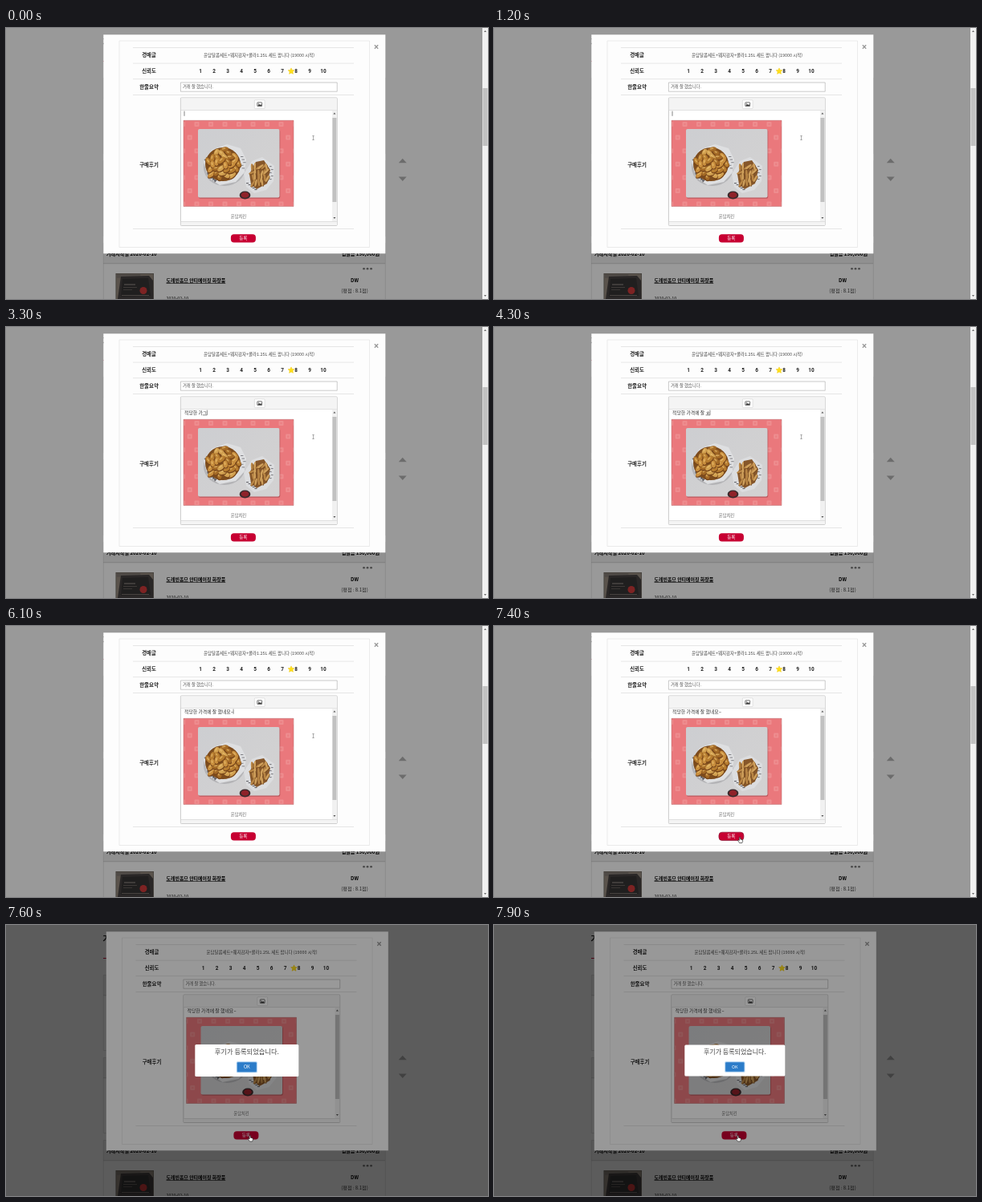
Recreate the animation shown at these times as an HTML page with a canvas. Size 600 by 338 pixels, loop 8000 ms.

```html
<!DOCTYPE html>
<html lang="ko">
<head>
<meta charset="utf-8">
<title>거래 후기 등록</title>
<style>
html, body { margin: 0; width: 100%; height: 100%; overflow: hidden; background: #999; }
canvas { display: block; width: 600px; height: 338px; }
</style>
</head>
<body>
<canvas id="stage"></canvas>
<script>
const W = 600, H = 338, LOOP = 8000, STEP = 100;
const ALERT_AT = 7446, SHIFT_AT = 7500;
const FONT = '"Noto Sans CJK KR", "Noto Sans KR", "Noto Sans CJK", "Noto Sans CJK JP", sans-serif';
const canvas = document.getElementById('stage');
const c = canvas.getContext('2d');
const dpr = window.devicePixelRatio || 1;
canvas.width = W * dpr;
canvas.height = H * dpr;

// ---------- helpers ----------
function rect(x, y, w, h, color) {
  c.fillStyle = color;
  c.fillRect(x, y, w, h);
}

function box(x, y, w, h, fill, stroke, r = 0, lw = 0.7) {
  c.beginPath();
  c.roundRect(x, y, w, h, r);
  if (fill) { c.fillStyle = fill; c.fill(); }
  if (stroke) { c.strokeStyle = stroke; c.lineWidth = lw; c.stroke(); }
}

function text(str, x, y, size, { color = '#333', align = 'left', weight = 400, font = FONT } = {}) {
  c.font = `${weight} ${size}px ${font}`;
  c.fillStyle = color;
  c.textAlign = align;
  c.textBaseline = 'alphabetic';
  c.fillText(str, x, y);
  return c.measureText(str).width;
}

function poly(points, fill, stroke, lw = 0.6) {
  c.beginPath();
  points.forEach(([x, y], i) => i ? c.lineTo(x, y) : c.moveTo(x, y));
  c.closePath();
  if (fill) { c.fillStyle = fill; c.fill(); }
  if (stroke) { c.strokeStyle = stroke; c.lineWidth = lw; c.stroke(); }
}

function ellipse(x, y, rx, ry, color, angle = 0) {
  c.beginPath();
  c.ellipse(x, y, rx, ry, angle, 0, Math.PI * 2);
  c.fillStyle = color;
  c.fill();
}

function triangle(x, y, w, h, color) {
  poly([[x - w / 2, y + h / 2], [x + w / 2, y + h / 2], [x, y - h / 2]], color);
}

function random(seed) {
  return () => (seed = (seed * 16807) % 2147483647) / 2147483647;
}

function mix(a, b, p) { return a + (b - a) * p; }
function clamp(v) { return Math.max(0, Math.min(1, v)); }
function smooth(p) { return p * p * (3 - 2 * p); }

// ---------- Hangul typing ----------
const LEADS = 'ㄱㄲㄴㄷㄸㄹㅁㅂㅃㅅㅆㅇㅈㅉㅊㅋㅌㅍㅎ';

// Every key press of one syllable: lead, lead + vowel, full block.
function strokes(ch) {
  const n = ch.charCodeAt(0) - 0xac00;
  if (n < 0 || n > 11171) return [ch];
  const list = [LEADS[Math.floor(n / 588)], String.fromCharCode(0xac00 + n - n % 28)];
  if (n % 28) list.push(ch);
  return list;
}

function typeOut(str, start, done = '') {
  const keys = [];
  let at = start;
  for (const ch of str) {
    for (const part of strokes(ch)) {
      keys.push({ at, done, part });
      at += STEP;
    }
    done += ch;
  }
  return keys;
}

const OPENING = '적당한 가격에 잘 ';
const KEYS = [
  ...typeOut(OPENING, 2100),
  { at: 4300, done: OPENING, part: 'ㅎ' },
  { at: 4600, done: OPENING, part: '해' },
  { at: 4900, done: OPENING, part: '했' },
  ...typeOut('네요~', 5500, OPENING + '했')
];

function drawTyped(t) {
  const x = 222, y = 108.6, size = 5.85;
  const key = KEYS.filter(k => k.at <= t).pop();
  let end = x;
  if (key) {
    if (key.part === '~') {
      end += text(key.done, x, y, size);
      end += text('~', end, y, size, { font: '"Open Sans", sans-serif', color: '#111' });
    } else {
      end += text(key.done + key.part, x, y, size);
      if (key.part >= 'ㄱ') {
        const w = c.measureText(key.part).width;
        rect(end - w, y + 1, w, 0.6, '#333');
      }
    }
  }
  const typing = t >= 2100 && t < 6000;
  if (t < 7300 && (typing || Math.floor(t / 500) % 2 === 0)) rect(end - 0.3, y - 5, 0.6, 6.2, '#333');
}

// ---------- page behind the dialog ----------
function drawThumb() {
  rect(136.5, 306, 47.5, 32, '#6f6862');
  rect(137.3, 306.8, 46, 32, '#958a7e');
  rect(137.3, 306.8, 30, 5, '#837b74');
  poly([[143, 310], [178, 309], [183, 315], [183.3, 338], [139, 338]], '#454141');
  poly([[145, 313], [177, 312], [180, 334], [143, 335]], '#363333');
  rect(147, 319.5, 14, 1, '#9a938e');
  rect(146, 323, 17, 0.8, '#736c68');
  rect(146, 326, 11, 0.8, '#6a6460');
  rect(144, 333, 34, 1, '#77706b');
  ellipse(171, 327.5, 4.5, 4.5, '#cf3a3a');
}

function drawPage() {
  rect(0, 0, W, H, '#fff');
  text('거래후기', 120.5, 21, 10, { weight: 700, color: '#111' });
  rect(121, 41, 351, 1, '#d0103a');
  for (let i = 0; i < 3; i++) {
    const y = 62.5 + i * 103;
    rect(121, y, 351, 25.5, '#efefef');
    box(121.3, y, 351, 94, null, '#d2d2d2', 0, 0.6);
    rect(121, y + 25, 351, 0.7, '#c4c4c4');
  }
  const bold = { weight: 700, color: '#000' };
  text('거래시작일 2020-02-10', 125, 284.3, 6.1, bold);
  text('입찰금 150,000원', 465, 284.3, 6.1, { ...bold, align: 'right' });
  for (let i = 0; i < 3; i++) ellipse(445.5 + i * 4.5, 300.2, 1.4, 1.2, '#777');
  drawThumb();

  const w = text('도레빈옴므 안티에이징 화장품', 199.5, 317.4, 5.95, bold);
  rect(199.5, 318.4, w, 0.6, '#000');
  text('2020-02-10', 199.5, 339.2, 5.4, { color: '#222' });
  text('DW', 434, 317.4, 6, { ...bold, align: 'center' });
  text('(평점 : 8.1점)', 434, 329.8, 6, { align: 'center' });

  triangle(493.7, 165.5, 10, 5.4, '#b4b4b4');
  triangle(493.7, 188.3, 10, -5.4, '#b4b4b4');
  rect(0, 0, W, H, 'rgba(0,0,0,.4)');
}

function drawPageScroll() {
  rect(593, 0, 7, H, '#f1f1f1');
  rect(593.5, 75, 6, 72, '#c1c1c1');
  triangle(596.5, 4, 3, 2, '#666');
  triangle(596.5, 334, 3, -2, '#666');
}

// ---------- food picture ----------
function drawChicken(rnd) {
  ellipse(272, 174, 26, 23, 'rgba(80,80,88,.22)');
  poly([[246, 166], [256, 152], [275, 145], [292, 150], [299, 164], [297, 180], [286, 192], [266, 196], [251, 186]], '#dedfe1');
  for (let i = 0; i < 5; i++) {
    const d = i * 2.2;
    poly([[246.5 + d, 164 - d * 1.1], [249 + d, 163 - d * 1.1], [248 + d, 166 - d]], '#707076');
    poly([[250 + d, 180 + d], [254 + d, 181 + d], [251 + d, 184 + d]], '#5e5e64');
    rect(292 + i % 3 * 1.6, 160 + i * 3.6, 3.4, 1, '#808086');
  }
  ellipse(270, 170, 22, 21, '#7d4c1d');
  const browns = ['#b67c2f', '#c98f3e', '#a46a26', '#d1a050'];
  for (let i = 0; i < 30; i++) {
    const a = i * 2.4, d = Math.sqrt((30 - i) / 30);
    const x = 270 + Math.cos(a) * d * 19.5, y = 169.5 + Math.sin(a) * d * 19;
    const len = 3.8 + rnd() * 2, turn = rnd() * 3;
    ellipse(x + 0.2, y + 1, len + 0.3, 3.2, '#77451a', turn);
    ellipse(x, y, len, 2.8, browns[i % 4], turn);
    ellipse(x - 0.6, y - 0.8, len * 0.45, 0.9, 'rgba(240,200,120,.6)', turn);
  }
}

function drawWedges(rnd) {
  poly([[296, 182], [306, 166], [319, 161], [334, 172], [333, 191], [324, 202], [309, 206], [299, 198]], '#dcdddf');
  for (let i = 0; i < 5; i++) {
    rect(299 + i * 2.6, 193 + i * 2, 3, 1.1, '#66666c');
    rect(328 + i % 2 * 2, 172 + i * 4, 2.6, 1.1, '#808086');
  }
  poly([[303, 182], [311, 167], [321, 165], [329, 177], [325, 194], [312, 201], [305, 195]], '#86572a');
  for (let i = 0; i < 22; i++) {
    const x = 306 + (i % 6) * 3.6 + rnd() * 2, y = 171 + Math.floor(i / 6) * 7 + rnd() * 4;
    const turn = -1.9 + rnd() * 1.6;
    ellipse(x + 0.6, y + 0.7, 4.6, 1.4, '#75491f', turn);
    ellipse(x, y, 4.6, 1.3, i % 2 ? '#cfa05c' : '#b98645', turn);
  }
}

function drawPhoto() {
  c.save();
  c.beginPath();
  c.rect(221, 115.3, 137, 107.2);
  c.clip();
  rect(221, 115, 138, 108, '#ea787c');
  for (let row = 0; row < 7; row++) {
    for (let col = 0; col < 9; col++) {
      const x = 217 + col * 17.5 + (row % 2) * 8.7, y = 117 + row * 16.6;
      box(x, y, 6, 6, 'rgba(255,225,220,.2)', null, 1);
      rect(x + 1.8, y + 1.8, 2.4, 2.4, 'rgba(234,120,124,.6)');
    }
  }
  const back = c.createLinearGradient(239, 126, 340, 211);
  back.addColorStop(0, '#cdced1');
  back.addColorStop(1, '#d3d2d2');
  box(239.8, 127, 101.5, 85.8, 'rgba(100,30,35,.35)', null, 2);
  box(239, 126, 101.5, 85.5, back, null, 2);

  const rnd = random(41);
  drawChicken(rnd);
  drawWedges(rnd);
  ellipse(297.5, 208.5, 6.8, 5, '#3a2a2c');
  ellipse(297.5, 208.3, 4.8, 3.5, '#8f2229');
  c.restore();
  box(221, 115.3, 137, 107.2, null, '#b9686a', 0, 0.5);
}

// ---------- dialog ----------
function drawStar(x, y) {
  const pts = [];
  for (let i = 0; i < 10; i++) {
    const r = i % 2 ? 2 : 4.1, a = -Math.PI / 2 + i * Math.PI / 5;
    pts.push([x + r * Math.cos(a), y + r * Math.sin(a)]);
  }
  poly(pts, '#ffe01a', '#f0c400', 0.5);
}

function drawDialog(t) {
  rect(121.3, 8.3, 351, 273, '#fdfdfd');
  box(141, 16, 311.5, 257.5, null, '#e2e2e2', 0, 0.7);
  [24.5, 44, 63.7, 83.3, 250.3].forEach(y => rect(158, y - 0.3, 275, 0.7, '#ddd'));

  c.strokeStyle = '#999';
  c.lineWidth = 1.3;
  c.beginPath();
  c.moveTo(458.8, 21.2); c.lineTo(463.2, 25.8);
  c.moveTo(463.2, 21.2); c.lineTo(458.8, 25.8);
  c.stroke();

  const label = { weight: 700, align: 'center', color: '#222' };
  text('경매글', 178, 36.3, 6.4, label);
  text('신뢰도', 178, 56, 6.4, label);
  text('한줄요약', 178, 75.6, 6.4, label);
  text('구매후기', 178, 172.6, 6.4, label);
  text('윤담달콤세트+웨지감자+콜라1.25L 세트 팝니다 (19000 시작)', 315, 36, 5.45, { align: 'center', color: '#444' });

  drawStar(355, 54);
  for (let n = 1; n <= 10; n++) {
    text(n, 242 + (n - 1) * 17, 56.2, 6.4, { ...label, font: 'Roboto, sans-serif' });
  }

  box(217.4, 68, 194.8, 11.2, '#fff', '#b4b4b4');
  text('거래 잘 했습니다.', 220, 75.3, 5.3, { color: '#555' });

  // editor
  box(217.4, 87, 194.8, 159.5, '#fff', '#b4b4b4', 1);
  rect(217.8, 87.4, 194, 15, '#f4f4f4');
  rect(217.8, 102.2, 194, 0.6, '#d0d0d0');
  box(309.3, 89.8, 12.8, 10.8, '#fff', '#d0d0d0', 1, 0.6);
  box(312.8, 92.8, 5.8, 4.8, '#fff', '#333', 0.5, 0.7);
  poly([[313.3, 97], [315, 94.8], [316.2, 96], [317.2, 95], [318.2, 97]], '#333');
  ellipse(314.4, 94.2, 0.5, 0.5, '#333');
  drawTyped(t);
  drawPhoto();
  text('윤담치킨', 289.5, 237.2, 5.3, { align: 'center', color: '#666' });
  rect(406, 102.8, 5.8, 138.5, '#f1f1f1');
  rect(406.4, 112, 5, 105, '#c1c1c1');
  triangle(408.9, 106.5, 3, 2, '#555');
  triangle(408.9, 237, 3, -2, '#555');
  rect(217.8, 241.3, 194, 4.8, '#f4f4f4');
  rect(217.8, 241.2, 194, 0.6, '#d0d0d0');

  const pressed = t >= 7300 && t < 7600;
  box(279.9, 257.2, 31, 10.3, '#c70032', pressed ? '#7d1230' : null, 4, 0.6);
  text('등록', 295.3, 264.4, 5.6, { align: 'center', color: '#fff' });
}

// ---------- alert ----------
function alertScale(ms) {
  const p = clamp(ms / 300);
  if (p < 0.45) return mix(0.7, 1.05, p / 0.45);
  if (p < 0.8) return mix(1.05, 0.95, (p - 0.45) / 0.35);
  return mix(0.95, 1, (p - 0.8) / 0.2);
}

function drawAlert(t) {
  const s = alertScale(t - ALERT_AT);
  c.save();
  c.translate(299.8, 169);
  c.scale(s, s);
  box(-62.5, -19.5, 125, 39, '#fff', null, 1.5);
  text('후기가 등록되었습니다.', 0, -8.2, 8, { align: 'center', color: '#444' });
  box(-12.6, 1.2, 25.2, 13.6, '#a9cdee', null, 1.5);
  box(-11.6, 2.2, 23.2, 11.6, '#2b7cc9', null, 1);
  text('OK', 0, 9.9, 5.4, { align: 'center', color: '#fff' });
  c.restore();
}

// ---------- pointer ----------
function drawPointer(t) {
  const p = smooth(clamp((t - 6200) / 1000));
  let x = mix(382.5, 306, p), y = mix(137, 264, p);
  if (t >= SHIFT_AT) { x = 303.8; y = 263.3; }
  c.save();
  c.translate(x, y);
  if (y < 241) {
    rect(-0.3, -2.5, 0.6, 5, '#777');
    rect(-1.2, -2.8, 2.4, 0.6, '#777');
    rect(-1.2, 2.2, 2.4, 0.6, '#777');
  } else if (y < 257) {
    poly([[0, 0], [0, 7], [1.6, 5.5], [2.8, 8], [3.8, 7.5], [2.7, 5.2], [4.8, 5]], '#fff', '#111');
  } else {
    poly([[-0.7, -0.6], [0.6, -0.6], [0.8, 2], [3.4, 2.6], [3.6, 4.6], [2.8, 6.6], [-0.4, 6.6], [-2.4, 3.6], [-1.8, 2.8], [-0.7, 3.6]], '#fff', '#111');
  }
  c.restore();
}

function draw(t) {
  c.setTransform(dpr, 0, 0, dpr, 0, 0);
  drawPage();
  const alerting = t >= SHIFT_AT;
  if (!alerting) drawPageScroll();
  c.save();
  if (alerting) c.translate(3.5, 0);
  drawDialog(t);
  c.restore();
  if (alerting) {
    rect(0, 0, W, H, `rgba(0,0,0,${0.4 * clamp((t - ALERT_AT + 8) / 100)})`);
    drawAlert(t);
  }
  drawPointer(t);
}

const start = performance.now();
function frame(now) {
  const t = Math.max(0, now - start) % LOOP;
  draw(Math.floor(t / STEP) * STEP);
  requestAnimationFrame(frame);
}
draw(0);
requestAnimationFrame(frame);
</script>
</body>
</html>
```
